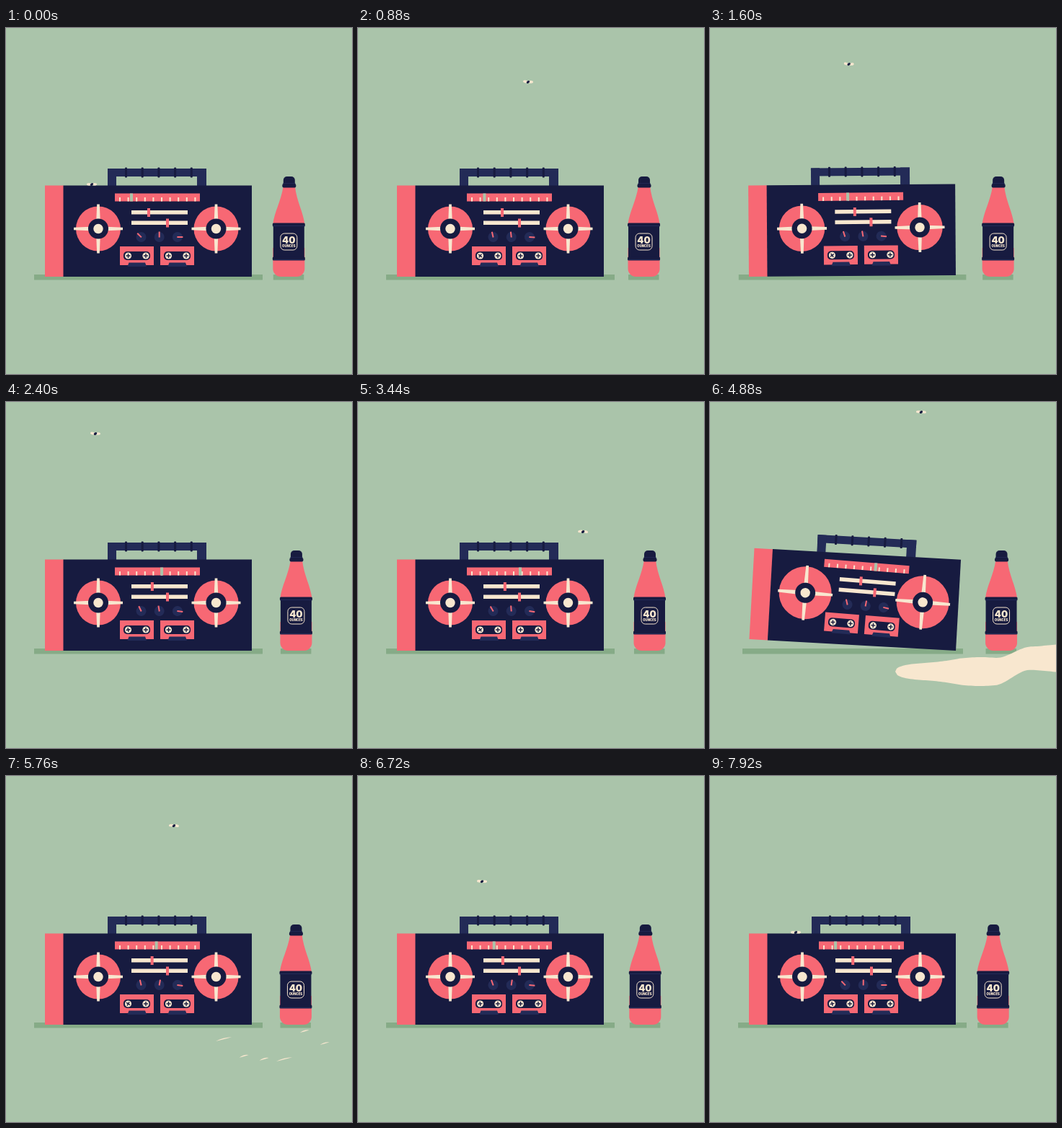
Animation, 480 px wide and 480 px high, one loop 8 s. Source, as an HTML page with a canvas:

```html
<!DOCTYPE html>
<html lang="en">
<head>
<meta charset="utf-8">
<title>Boombox</title>
<style>
html, body { margin: 0; height: 100%; overflow: hidden; background: #aac4aa; }
canvas { display: block; width: 100vw; height: 100vh; }
</style>
</head>
<body>
<canvas id="stage" width="480" height="480"></canvas>
<script>
const c = document.getElementById('stage').getContext('2d');
const LOOP = 8000, BEATS = 7, PI = Math.PI, TAU = PI * 2;
const GREEN = '#aac4aa', SHADE = '#86ab87', CORAL = '#f76874',
      NAVY = '#171b40', BLUE = '#232b57', CREAM = '#f8e7cf';

const clamp = v => Math.max(0, Math.min(1, v));
const ramp = (v, a, b) => { const u = clamp((v - a) / (b - a)); return u * u * (3 - 2 * u); };

// Controls drift away from their resting place and return once per loop (u: 0 to 1).
const swell = u => Math.sin(PI * u);
const tunerX = u => 174 + 51 * ramp(u, .08, .38) * (1 - ramp(u, .55, 1));
const sliderX = u => 198 + 6 * swell(u);
const knobs = [
  u => -45 + clamp(3 * swell(u)) * (23 + 9 * Math.cos(TAU * (u - .11) / .6)),
  u => -10 * Math.sin(TAU * u),
  u => 90 + 10 * swell(u)
];
const bottleX = u => 392.3 + 12.5 * swell(u);

// Time, x and y of the fly's turning points.
const flight = [[80, 119, 217], [880, 236, 75], [1760, 180, 48], [2400, 124, 44], [3440, 312, 180],
  [4100, 390, 50], [4880, 293, 14], [5760, 233, 69], [7120, 150, 176], [7840, 119, 217]];

// Monotone cubic through one column of the flight.
function along(t, column) {
  const rate = i => (flight[i + 1][column] - flight[i][column]) / (flight[i + 1][0] - flight[i][0]);
  const slope = i => {
    if (i < 1 || i > flight.length - 2) return 0;
    const a = rate(i - 1), b = rate(i);
    return a * b <= 0 ? 0 : 2 * a * b / (a + b);
  };
  let i = 0;
  while (i < flight.length - 2 && t > flight[i + 1][0]) i++;
  const span = flight[i + 1][0] - flight[i][0], v = clamp((t - flight[i][0]) / span);
  return flight[i][column] + rate(i) * span * ramp(v, 0, 1)
    + span * v * (1 - v) * (slope(i) * (1 - v) - slope(i + 1) * v);
}

function rect(color, x, y, w, h, r = 0) {
  c.fillStyle = color;
  c.beginPath();
  c.roundRect(x, y, w, h, r);
  c.fill();
}
function oval(color, x, y, rx, ry = rx, turn = 0) {
  c.fillStyle = color;
  c.beginPath();
  c.ellipse(x, y, rx, ry, turn, 0, TAU);
  c.fill();
}
function at(x, y, degrees, draw) {
  c.save();
  c.translate(x, y);
  c.rotate(degrees * PI / 180);
  draw();
  c.restore();
}

function speaker(x, pulse) {
  at(x, 278.5, 0, () => {
    oval(CORAL, 0, 0, 31 + 5.5 * pulse);
    const tip = 34 + 4 * pulse;
    for (let i = 0; i < 4; i++) {
      c.rotate(PI / 2);
      c.fillStyle = CREAM;
      c.beginPath();
      c.moveTo(-3.2, 0); c.lineTo(-1.8, -tip); c.lineTo(1.8, -tip); c.lineTo(3.2, 0);
      c.fill();
    }
    oval(NAVY, 0, 0, 14);
    oval(CREAM, 0, 0, 6.7);
  });
}

function cassette(x, turn) {
  rect(CORAL, x, 303, 47, 26);
  rect(NAVY, x + 5, 310, 37, 12, 5);
  [turn, 0].forEach((angle, i) => at(x + 11.5 + i * 24.5, 316, angle, () => {
    oval(CREAM, 0, 0, 4.6);
    rect(NAVY, -3, -.7, 6, 1.4);
    rect(NAVY, -.7, -3, 1.4, 6);
  }));
  c.fillStyle = BLUE;
  c.beginPath();
  c.moveTo(x + 12.5, 325.5); c.lineTo(x + 35, 325.5); c.lineTo(x + 37, 331); c.lineTo(x + 10.5, 331);
  c.fill();
}

function panel(u, tilt) {
  rect(CORAL, 151, 229.5, 118, 11);
  for (let i = 0; i < 10; i++) rect(CREAM, 157 + i * 11.6, 235, 2, 5.5);
  rect(GREEN, tunerX(u) - 2, 229.5, 4, 11);

  [sliderX(u), 224].forEach((x, i) => {
    const y = 253 + i * 14.5;
    rect(CREAM, 174, y, 78, 5.5);
    rect(CORAL, x - 2, y - 3, 4, 12);
  });
  knobs.forEach((angle, i) => at(187.5 + i * 25.2, 290, angle(u), () => {
    oval(BLUE, 0, 0, 7);
    rect(CORAL, -1, -7.5, 2, 8);
  }));
  speaker(128, tilt);
  speaker(291.5, tilt);
  cassette(158, u * 13 * 90);
  cassette(214, 0);
}

function boombox(u, tilt, side) {
  const pivot = side > 0 ? 341 : 54;
  at(pivot, 345, 3.2 * tilt * side, () => {
    c.translate(-pivot, -345);
    rect(BLUE, 141, 195, 137, 11);
    rect(BLUE, 141, 195, 12, 24);
    rect(BLUE, 265, 195, 13, 24);
    for (let i = 0; i < 5; i++) rect(NAVY, 165 + i * 22.7, 193.5, 3, 14, 1);
    rect(CORAL, 54, 218.5, 26, 126.5);
    rect(NAVY, 79.5, 218.5, 261.5, 126.5);
    // The front parts swing a little further than the case.
    at(210, 278, 1.4 * tilt * side, () => {
      c.translate(-210, -278);
      panel(u, tilt);
    });
  });
}

function bottle(x) {
  at(x, 345, 0, () => {
    c.fillStyle = CORAL;
    c.beginPath();
    c.moveTo(-7.5, -126);
    c.bezierCurveTo(-11, -104, -20, -90, -22, -73);
    c.lineTo(22, -73);
    c.bezierCurveTo(20, -90, 11, -104, 8.5, -126);
    c.fill();
    rect(CORAL, -22, -40, 44, 40, [0, 0, 11, 11]);
    rect(NAVY, -21.5, -74, 43, 51);
    [-74.5, -27.5].forEach(y => {
      rect(NAVY, -22.5, y, 45, 5, 1.5);
      rect(BLUE, -22, y + 3.5, 44, 1);
    });
    rect(NAVY, -7.5, -139, 16, 13, [5, 5, 0, 0]);
    rect(NAVY, -9, -129, 19, 5.5, 2);
    rect(BLUE, -8, -130, 17, .8);
    c.strokeStyle = CREAM;
    c.lineWidth = 1;
    c.beginPath();
    c.roundRect(-11.5, -60, 23, 23, 5.5);
    c.stroke();
    c.fillStyle = CREAM;
    c.textAlign = 'center';
    c.font = '900 13px Inter, sans-serif';
    c.fillText('40', 0, -46.5);
    c.font = '900 4.3px Inter, sans-serif';
    c.fillText('OUNCES', 0, -41.3);
  });
}

// Puddle edge at x; side is -1 for the top and 1 for the bottom.
function shore(x, side) {
  const middle = 374 - 18.5 * ramp(x, 395, 445);
  const taper = clamp((x - 257) / 90) ** .4;
  return middle + side * taper * (18 + 2 * Math.cos((x - 375) / 20));
}

function outline(place) {
  for (let x = 520; x >= 257; x -= 3) c.lineTo(...place(x, shore(x, -1)));
  for (let x = 257; x <= 520; x += 3) c.lineTo(...place(x, shore(x, 1)));
  c.closePath();
}

// The liquid rushes in from the right, settles, then dries from the middle outwards.
function spill(t) {
  if (t < 3950 || t > 6160) return;
  const enter = clamp((t - 3950) / 650);
  const shift = 270 * (1 - enter) ** 3;
  const surge = Math.sin(PI * enter) ** 2;
  const hole = ramp(t, 5050, 5680);
  c.fillStyle = CREAM;
  if (hole < 1) {
    c.beginPath();
    outline((x, y) => [x + shift, y + surge * (y > 371 ? 75 : -25) * clamp((x - 250) / 130)]);
    if (hole > 0) {
      c.moveTo(385 + 135 * hole, 370);
      outline((x, y) => [385 + (x - 385) * hole, 370 + (y - 370) * hole]);
    }
    c.fill('evenodd');
  }
  const left = ramp(t, 5450, 5650) * (1 - ramp(t, 5700, 6160));
  for (let i = 0; i < 6 && left; i++) {
    const x = 302 + i * 28, side = i % 4 ? 1 : -1;
    const r = left * (2 + 10 * Math.abs(Math.cos(i * 1.05)));
    at(x, shore(x, side) + (side < 0 ? 3 : -1), -12, () => {
      c.beginPath();
      c.moveTo(-r, 1);
      c.quadraticCurveTo(0, -2.5 * left, r, 0);
      c.quadraticCurveTo(0, .6 * left, -r, 1);
      c.fill();
    });
  }
}

function fly(t) {
  const moving = t > 80 && t < 7840;
  const flap = moving ? Math.sin(t * .029) * .35 : 0;
  at(along(t, 1), along(t, 2), moving ? 4 : 0, () => {
    oval(CREAM, -3.8, -.3, 3.2, 1.8, flap);
    oval(CREAM, 3.8, -.3, 3.2, 1.8, -flap);
    oval(NAVY, 0, 0, 2.4, 1.6, -.6);
  });
}

function draw(t) {
  const u = t / LOOP, beat = Math.floor(u * BEATS);
  const tilt = Math.sin(PI * clamp((u * BEATS - beat - .1) / .34)) ** 2;
  rect(GREEN, 0, 0, 480, 480);
  rect(SHADE, 39 + 6 * tilt, 342, 317 - 11 * tilt, 7.5);
  rect(SHADE, bottleX(u) - 21.5, 342, 42.5, 7.5);
  spill(t);
  boombox(u, tilt, beat % 2 ? -1 : 1);
  bottle(bottleX(u));
  fly(t);
}

function frame(now) {
  draw(now % LOOP);
  requestAnimationFrame(frame);
}
requestAnimationFrame(frame);
</script>
</body>
</html>
```
